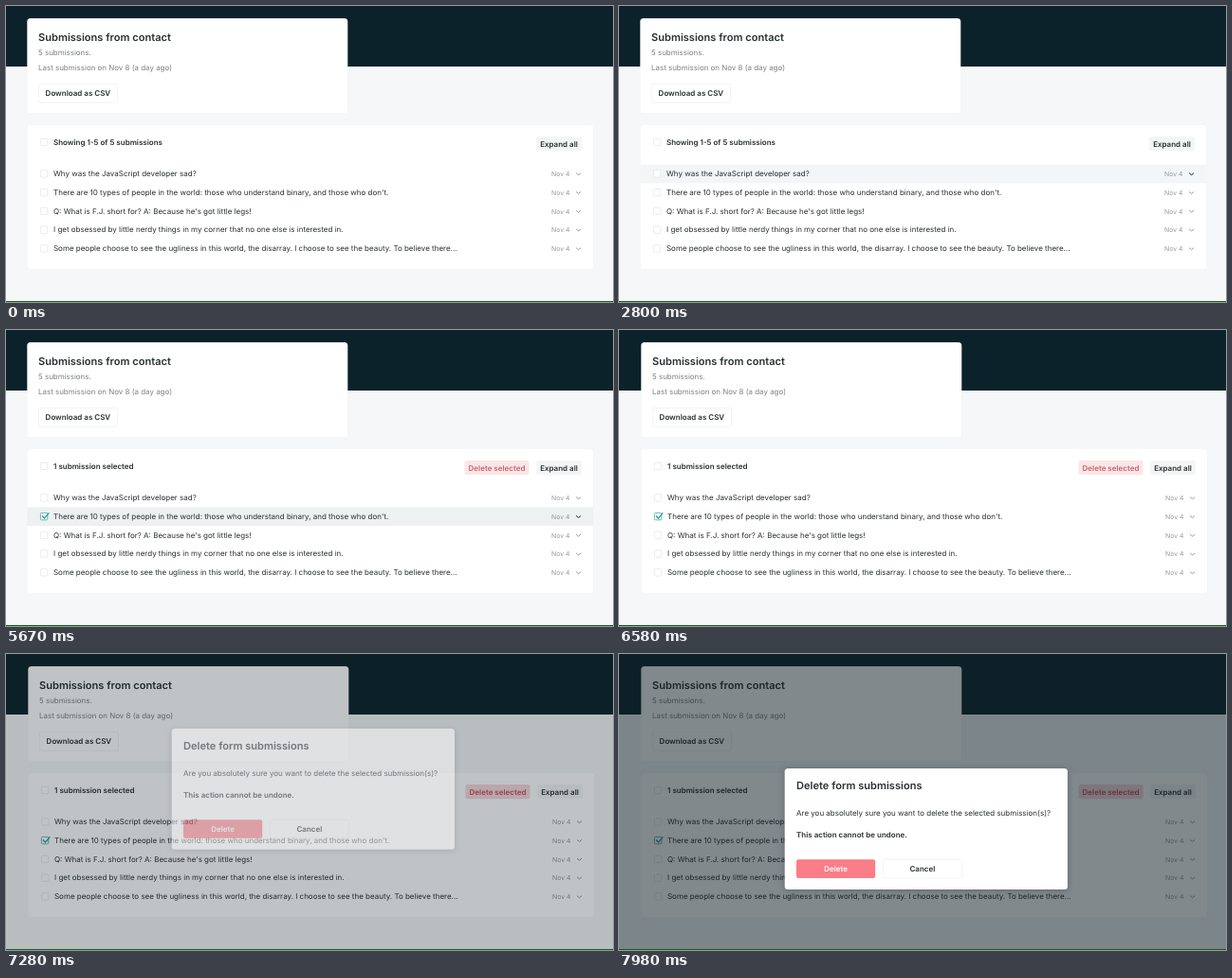
These frames come from a looping animation (640x313 px, 8000 ms). An HTML page:

```html
<!DOCTYPE html>
<html lang="en">
<head>
<meta charset="utf-8">
<title>Form submissions</title>
<style>
  html, body { margin: 0; width: 100%; height: 100%; overflow: hidden; background: #f5f7f8; }
  svg { display: block; width: 100%; height: 100%; }
  text { font: 400 7.99px Inter, Roboto, sans-serif; fill: #2a3032; text-rendering: geometricPrecision; white-space: pre; }
  .title { font-size: 11.08px; font-weight: 600; }
  .bold { font-weight: 600; }
  .muted { font-size: 7.94px; fill: #7c8183; }
  .date { font-size: 6.85px; fill: #92989a; }
  .mid { text-anchor: middle; }
  .card { fill: #fff; filter: drop-shadow(0 .6px .4px rgba(14, 30, 37, .08)); }
  .box { fill: #fff; stroke: #e3e6e7; stroke-width: .8; }
  .chevron { fill: none; stroke-width: 1; stroke-linecap: round; stroke-linejoin: round; }
</style>
</head>
<body>
<svg id="stage" viewBox="0 0 640 313" preserveAspectRatio="none"></svg>
<script>
const LOOP = 8000;
const HOVER_IN = 2520, HOVER_OUT = 3010, HOVER_AGAIN = 4410, HOVER_NEXT = 5040;
const CHECK = 5670, LEAVE = 6160, HOVER_DELETE = 6700, OPEN = 7280;
const ROW_TOP = 167.7, PITCH = 19.75;

const NS = 'http://www.w3.org/2000/svg';
const stage = document.getElementById('stage');

function add(parent, tag, attrs, content) {
  const el = document.createElementNS(NS, tag);
  for (const key in attrs) el.setAttribute(key, attrs[key]);
  if (content) el.textContent = content;
  return parent.appendChild(el);
}
const rect = (parent, x, y, width, height, attrs) =>
  add(parent, 'rect', { x, y, width, height, ...attrs });
const label = (parent, x, y, content, cls = '') =>
  add(parent, 'text', { x, y, class: cls }, content);
const checkbox = (parent, y) =>
  rect(parent, 36.4, y - 3.7, 7.4, 7.4, { rx: 1, class: 'box' });

function button(parent, x, y, width, height, content, attrs) {
  const shape = rect(parent, x, y, width, height, { rx: 2, ...attrs });
  const text = label(parent, x + width / 2, y + height / 2 + 2.9, content, 'bold mid');
  return { shape, text };
}
const outlined = { class: 'card', stroke: '#eff1f1', 'stroke-width': .6 };

rect(stage, 0, 0, 640, 313, { fill: '#f5f7f8' });
rect(stage, 0, 0, 640, 64, { fill: '#0c222a' });
const page = add(stage, 'g');

// Summary card
rect(page, 22.3, 13, 338, 100.6, { rx: 3.5, class: 'card' });
label(page, 34, 36.6, 'Submissions from contact', 'title');
label(page, 34, 52, '5 submissions.', 'muted');
label(page, 34, 67.5, 'Last submission on Nov 8 (a day ago)', 'muted');
button(page, 34.3, 82.4, 83.2, 19.6, 'Download as CSV', outlined);

// Submission list
rect(page, 22.3, 126, 597, 152, { rx: 3.5, class: 'card' });
checkbox(page, 144);
const heading = label(page, 50, 146.8, '', 'bold');
button(page, 559, 138, 48, 15.3, 'Expand all', { fill: '#f4f6f6' });
const removeGroup = add(page, 'g');
const remove = button(removeGroup, 483.5, 138, 68, 15.3, 'Delete selected', {});

const rows = [
  'Why was the JavaScript developer sad?',
  "There are 10 types of people in the world: those who understand binary, and those who don't.",
  "Q: What is F.J. short for? A: Because he's got little legs!",
  'I get obsessed by little nerdy things in my corner that no one else is interested in.',
  'Some people choose to see the ugliness in this world, the disarray. I choose to see the beauty. To believe there...'
].map((content, i) => {
  const top = ROW_TOP + i * PITCH, mid = top + 9.7;
  const back = rect(page, 22.3, top, 597, PITCH, {});
  const box = checkbox(page, mid);
  label(page, 50, mid + 2.8, content);
  label(page, 575, mid + 2.6, 'Nov 4', 'date');
  const chevron = add(page, 'path', { d: `M601.4 ${mid - .5}l2.2 1.8 2.2-1.8`, class: 'chevron' });
  return { back, box, chevron, mid };
});
const tick = add(page, 'path', {
  d: `M38 ${rows[1].mid - .6}l2.5 2.5 4.8-5.6`,
  fill: 'none', stroke: '#239a96', 'stroke-width': 1.3
});

// Confirmation dialog
const shade = rect(stage, 0, 0, 640, 313, { fill: '#0e1e25' });
const dialog = add(stage, 'g');
rect(dialog, 174.7, 121, 298.3, 128, {
  rx: 3.5, fill: '#fff', style: 'filter: drop-shadow(0 1.5px 3px rgba(14, 30, 37, .3))'
});
label(dialog, 187, 143.1, 'Delete form submissions', 'title');
label(dialog, 187, 170.8, 'Are you absolutely sure you want to delete the selected submission(s)?');
label(dialog, 187, 194.3, 'This action cannot be undone.', 'bold');
const confirm = button(dialog, 187, 217.4, 83.2, 19.6, 'Delete', { fill: '#fa7d87' });
confirm.text.style.fill = '#fff';
button(dialog, 278.4, 217.4, 83, 19.6, 'Cancel', outlined);

rect(stage, 0, 312, 640, 1, { fill: '#0a6610' });

function hoveredRow(t) {
  if (t >= HOVER_IN && t < HOVER_OUT) return 0;
  if (t >= HOVER_AGAIN && t < HOVER_NEXT) return 0;
  if (t >= HOVER_NEXT && t < LEAVE) return 1;
  return -1;
}

function draw(t) {
  const checked = t >= CHECK, hover = hoveredRow(t), overDelete = t >= HOVER_DELETE;
  page.setAttribute('transform', `translate(${t >= LEAVE ? 1 : 0} 0)`);

  rows.forEach((row, i) => {
    const on = i === hover;
    row.back.setAttribute('fill', !on ? 'none' : checked ? '#eef1f1' : '#f3f5f6');
    row.chevron.setAttribute('stroke', on ? '#17262d' : '#969c9e');
  });
  rows[1].box.style.stroke = checked ? '#3fa9a4' : '';
  tick.setAttribute('visibility', checked ? 'visible' : 'hidden');

  heading.textContent = checked ? '1 submission selected' : 'Showing 1-5 of 5 submissions';
  removeGroup.setAttribute('visibility', checked ? 'visible' : 'hidden');
  remove.shape.setAttribute('fill', overDelete ? '#f8d8dc' : '#fae7e8');
  remove.text.style.fill = overDelete ? '#c74f5c' : '#cb636b';

  const since = t - OPEN;
  const fade = since < 0 ? 0 : Math.min(1, .5 + since / 140);
  const drop = -22.5 * Math.exp((70 - since) / 110);
  shade.setAttribute('opacity', .52 * fade);
  dialog.setAttribute('opacity', fade);
  dialog.setAttribute('transform', `translate(0 ${since < 0 ? 0 : drop.toFixed(2)})`);
}

const start = performance.now();
function tickFrame() {
  draw((performance.now() - start) % LOOP);
  requestAnimationFrame(tickFrame);
}
tickFrame();
</script>
</body>
</html>
```
